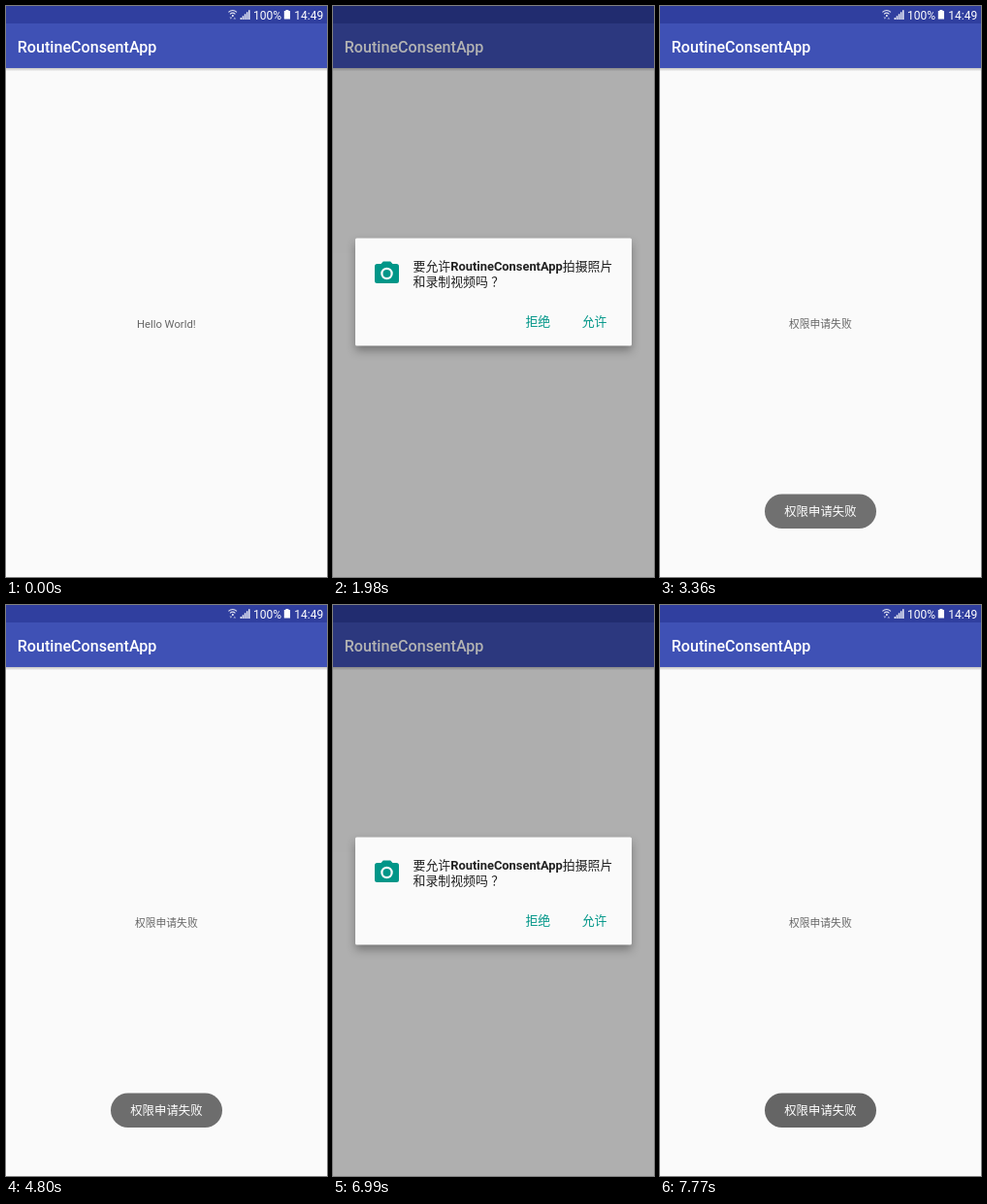
Recreate the animation shown at these times as an HTML page. Size 331 px wide and 589 px high, loop 8 s.

```html
<!DOCTYPE html>
<html lang="zh-CN">
<head>
<meta charset="utf-8">
<title>Permission request</title>
<style>
  html, body { margin: 0; width: 100%; height: 100%; overflow: hidden; background: #fafafa; }
  svg { display: block; width: 331px; height: 589px; font-family: Roboto, "Noto Sans CJK SC", sans-serif; }
  .mid { text-anchor: middle; }
  .body { font-size: 11.27px; fill: #666; }
  .large { font-size: 12.88px; }
  #denied { font-size: 10.8px; }
  #toast { font-size: 12.4px; }
  #dialog { transform-origin: 165.5px 295px; }
  #ripple { transform-origin: 211px 326px; }
  #card { filter: drop-shadow(0 5px 5px rgba(0, 0, 0, .32)); }
</style>
</head>
<body>
<svg viewBox="0 0 331 589">
  <defs>
    <linearGradient id="fade" x2="0" y2="1">
      <stop stop-color="#000" stop-opacity=".22"/>
      <stop offset="1" stop-color="#000" stop-opacity="0"/>
    </linearGradient>
    <clipPath id="top"><path d="M0 0H331V18H0z"/></clipPath>
  </defs>

  <path d="M0 0H331V589H0z" fill="#fafafa"/>
  <path d="M0 64H331V67.5H0z" fill="url(#fade)"/>
  <path d="M0 18H331V64H0z" fill="#3f51b5"/>
  <path d="M0 0H331V18H0z" fill="#303f9f"/>
  <text x="11.8" y="47.6" font-size="16.1" font-weight="500" fill="#fff">RoutineConsentApp</text>
  <text id="hello" class="mid body" x="165.3" y="331.5">Hello World!</text>
  <text id="denied" class="mid body" x="165.3" y="331.6">权限申请失败</text>

  <path id="scrim" d="M0 0H331V589H0z"/>

  <g id="dialog">
    <rect id="card" x="23" y="239.5" width="285" height="111" rx="1.6" fill="#fafafa"/>
    <g transform="translate(40.5 261) scale(1.25)" fill="#009688">
      <path fill-rule="evenodd" d="M9 2 7.2 4H4a2 2 0 0 0-2 2v12a2 2 0 0 0 2 2h16a2 2 0 0 0 2-2V6a2 2 0 0 0-2-2h-3.2L15 2zM12 7a5 5 0 1 1 0 10 5 5 0 0 1 0-10z"/>
      <circle cx="12" cy="12" r="3.2"/>
    </g>
    <g class="large" fill="#212121">
      <text x="82.6" y="273.3">要允许<tspan font-weight="700">RoutineConsentApp</tspan>拍摄照片</text>
      <text x="82.6" y="288.8">和录制视频吗<tspan dx="3.5">？</tspan></text>
    </g>
    <circle id="ripple" cx="211" cy="326" r="11" fill="#000" fill-opacity=".08"/>
    <g class="mid large" fill="#009688">
      <text x="211.3" y="329.8">拒绝</text>
      <text x="269.6" y="329.8">允许</text>
    </g>
  </g>

  <g clip-path="url(#top)">
    <g id="status" fill="#fff">
      <path d="M229.4 6.3Q233.7 2.6 238 6.3M231 8.3Q233.7 6 236.4 8.3" fill="none" stroke="#fff" stroke-opacity=".85" stroke-width="1.1"/>
      <circle cx="233.8" cy="10" r="1"/>
      <path id="down" d="M230.4 11.4h3l-1.5 2.4z"/>
      <path d="M234.4 13.6h2.8l-1.4-2.2z" fill-opacity=".55"/>
      <path fill-opacity=".9" d="M241.6 12h1.5v2h-1.5zM243.7 10.2h1.5V14h-1.5zM245.8 8.2h1.5V14h-1.5zM247.9 6.2h1.5V14h-1.5zM250 4.2h1.5V14H250z"/>
      <path d="M288.4 4h3v1h1.6v8.6h-6.2V5h1.6z"/>
      <text x="255.1" y="13.5" font-size="12">100%</text>
      <text x="297.3" y="13.5" font-size="12">14:49</text>
    </g>
  </g>

  <g id="toast">
    <rect x="108" y="503.5" width="115" height="35.5" rx="17.75" fill="#656565"/>
    <text class="mid" x="165.4" y="526" fill="#fff">权限申请失败</text>
  </g>
</svg>
<script>
  const LOOP = 8000;
  const SOFT = 'cubic-bezier(.33, .67, .67, 1)';  // quadratic ease out
  const CUBIC = 'cubic-bezier(.33, 1, .67, 1)';   // cubic ease out

  // steps: [time, value, easing up to the next step]
  function play(id, prop, steps) {
    const all = [[0, steps[0][1]], ...steps, [LOOP, steps[steps.length - 1][1]]];
    const frames = all.map(([t, v, easing = 'linear']) => ({ offset: t / LOOP, [prop]: v, easing }));
    document.getElementById(id).animate(frames, { duration: LOOP, iterations: Infinity });
  }

  const tween = (start, span, from, to, easing) => [[start, from, easing], [start + span, to]];
  const cut = (t, from, to) => [[t, from], [t, to]];

  const opens = [1650, 5780];
  const closes = [2675, 7102];
  const presses = [2620, 6990];
  const toasts = [2990, 7370];
  const visits = make => opens.flatMap((open, i) => make(open, closes[i], presses[i]));

  play('scrim', 'opacity', visits((open, close) => [
    ...tween(open, 200, 0, .3), ...tween(close + 38, 250, .3, 0)
  ]));
  play('dialog', 'opacity', visits((open, close) => [
    ...tween(open, 165, 0, 1, SOFT), ...tween(close, 200, 1, 0, SOFT)
  ]));
  play('dialog', 'transform', visits((open, close) => [
    ...tween(open, 210, 'scale(.9)', 'scale(1)', CUBIC), ...cut(close + 240, 'scale(1)', 'scale(.9)')
  ]));
  play('ripple', 'transform', visits((open, close, press) => [
    ...tween(press, 150, 'scale(0)', 'scale(1)', SOFT), ...cut(close + 240, 'scale(1)', 'scale(0)')
  ]));
  play('status', 'transform', visits((open, close) => [
    ...tween(open, 100, 'translateY(0px)', 'translateY(-16px)'),
    ...tween(close + 143, 240, 'translateY(-16px)', 'translateY(0px)', SOFT)
  ]));
  play('hello', 'opacity', cut(2720, 1, 0));
  play('denied', 'opacity', cut(2720, 0, 1));
  play('toast', 'opacity', [
    ...tween(toasts[0], 400, 0, 1), ...tween(4780, 370, 1, 0), ...tween(toasts[1], 390, 0, 1)
  ]);
  play('down', 'opacity', [
    ...cut(1320, .55, .95), ...cut(1700, .95, .55), ...cut(4980, .55, .95), ...cut(5900, .95, .55)
  ]);
</script>
</body>
</html>
```
